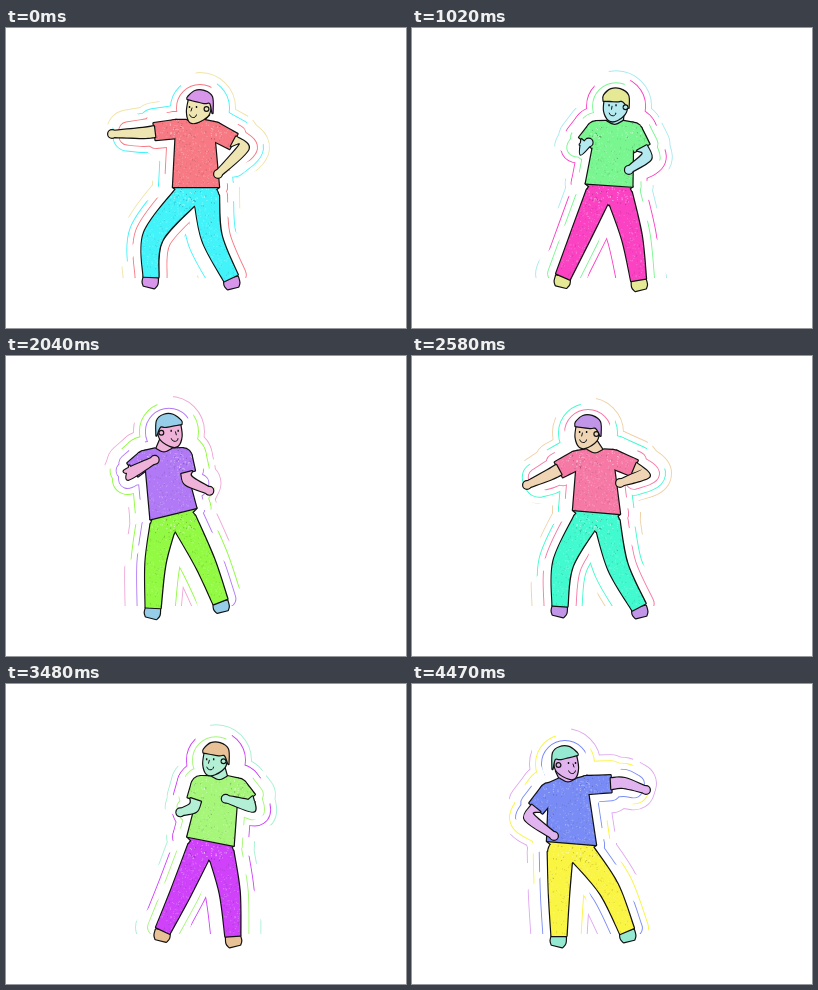
Write an HTML page with a canvas that moves like this. It is 400 by 300 pixels and loops after 4500 ms.

```html
<!DOCTYPE html>
<html>
<head>
<meta charset="utf-8">
<style>
html, body { margin: 0; height: 100%; overflow: hidden; background: #fff; }
canvas { display: block; }
</style>
</head>
<body>
<canvas width="400" height="300"></canvas>
<script>
const ctx = document.querySelector('canvas').getContext('2d');
const LOOP = 4500, DANCE = 2700, STEP = 30, AXIS = 374, INK = '#111';

// Key poses as joints; "left" is the left side of the stage, turn is -1 (facing left) to 1.
// Arms: shoulder, elbow, hand. Legs: waist corner, knee, ankle.
const poses = [
  { time: 0, turn: -1, head: [194, 80],
    armL: [[170, 101], [137, 105], [106, 106]], armR: [[208, 103], [238, 119], [212, 146]],
    legL: [[167, 159], [147, 209], [145, 249]], legR: [[213, 159], [206, 210], [225, 250]] },
  { time: 390, turn: -1, head: [213, 84],
    armL: [[198, 105], [172, 112], [137, 112]], armR: [[239, 110], [261, 131], [226, 149]],
    legL: [[191, 161], [152, 192], [168, 242]], legR: [[236, 167], [218, 210], [227, 251]] },
  { time: 600, turn: -1, head: [213, 76],
    armL: [[200, 101], [195, 124], [169, 134]], armR: [[238, 104], [256, 120], [222, 104]],
    legL: [[186, 152], [176, 206], [161, 245]], legR: [[232, 164], [225, 208], [227, 252]] },
  { time: 1200, turn: -.2, head: [197, 79],
    armL: [[175, 103], [154, 121], [175, 111]], armR: [[212, 103], [227, 128], [218, 151]],
    legL: [[167, 157], [163, 209], [148, 250]], legR: [[214, 157], [217, 209], [226, 251]] },
  { time: 1470, turn: 1, head: [161, 75],
    armL: [[144, 105], [123, 129], [150, 151]], armR: [[182, 95], [222, 88], [243, 92]],
    legL: [[142, 155], [151, 210], [149, 253]], legR: [[191, 158], [209, 196], [222, 245]] },
  { time: 1770, turn: 1, head: [153, 80],
    armL: [[137, 108], [117, 133], [142, 152]], armR: [[175, 101], [212, 99], [234, 106]],
    legL: [[135, 157], [147, 212], [147, 252]], legR: [[184, 161], [197, 205], [215, 247]] },
  { time: 2580, turn: -.7, head: [176, 77],
    armL: [[165, 104], [137, 119], [115, 129]], armR: [[201, 103], [234, 117], [208, 127]],
    legL: [[161, 154], [151, 208], [148, 250]], legR: [[208, 158], [206, 211], [227, 251]] }
];

function mirror(p, time) {
  const flip = ([x, y]) => [AXIS - x, y];
  return { time, turn: -p.turn, head: flip(p.head),
    armL: p.armR.map(flip), armR: p.armL.map(flip), legL: p.legR.map(flip), legR: p.legL.map(flip) };
}
// The way back repeats the twist on the other side.
poses.splice(6, 0, mirror(poses[2], 1950));

// Cyclic spline through the key poses.
function poseAt(time) {
  const n = poses.length, i = poses.findLastIndex(p => p.time <= time);
  const keys = [-1, 0, 1, 2].map(k => poses[(i + k + n) % n]);
  const times = keys.map((p, k) => p.time + DANCE * Math.floor((i + k - 1) / n));
  const span = times[2] - times[1], u = (time - times[1]) / span;
  const mix = ([a, b, c, d]) => {
    if (Array.isArray(b)) return b.map((_, k) => mix([a[k], b[k], c[k], d[k]]));
    const start = (c - a) / (times[2] - times[0]) * span * .8;
    const end = (d - b) / (times[3] - times[1]) * span * .8;
    return b + (c - b) * u * u * (3 - 2 * u) + start * u * (1 - u) ** 2 - end * u * u * (1 - u);
  };
  const names = ['turn', 'head', 'armL', 'armR', 'legL', 'legR'];
  return Object.fromEntries(names.map(name => [name, mix(keys.map(p => p[name]))]));
}

const lerp = (a, b, t) => [a[0] + (b[0] - a[0]) * t, a[1] + (b[1] - a[1]) * t];
const shift = (p, x, y) => [p[0] + x, p[1] + y];

function curve(path, pts) {
  path.lineTo(...pts[0]);
  for (let i = 0; i < pts.length - 1; i++) {
    const a = pts[i], b = pts[i + 1], before = pts[i - 1] || a, after = pts[i + 2] || b;
    path.bezierCurveTo(a[0] + (b[0] - before[0]) / 6, a[1] + (b[1] - before[1]) / 6,
      b[0] - (after[0] - a[0]) / 6, b[1] - (after[1] - a[1]) / 6, ...b);
  }
}

function outline(...curves) {
  const path = new Path2D();
  curves.forEach(pts => curve(path, pts));
  path.closePath();
  return path;
}

const polygon = (...pts) => outline(...pts.map(p => [p]));

function disc([x, y], r) {
  const path = new Path2D();
  path.arc(x, y, r, 0, 7);
  return path;
}

// Tapered tube along the joints.
function limb(joints, widths) {
  const side = sign => joints.map(([x, y], i) => {
    const a = joints[i - 1] || joints[i], b = joints[i + 1] || joints[i];
    const angle = Math.atan2(b[1] - a[1], b[0] - a[0]), r = sign * widths[i] / 2;
    return [x - Math.sin(angle) * r, y + Math.cos(angle) * r];
  });
  return outline(side(1), side(-1).reverse());
}

function random(seed) {
  return () => (seed = seed * 16807 % 2147483647) / 2147483647;
}

function makeGrain() {
  const tile = document.createElement('canvas');
  tile.width = tile.height = 64;
  const c = tile.getContext('2d'), rnd = random(7);
  for (let i = 0; i < 420; i++) {
    c.fillStyle = i % 3 ? 'rgba(255,255,255,.25)' : 'rgba(0,0,0,.13)';
    c.fillRect(rnd() * 64, rnd() * 64, 1, 1);
  }
  return ctx.createPattern(tile, 'repeat');
}
const grain = makeGrain();

// Inks the joint outline of all paths, then fills them.
function paint(paths, ...fills) {
  ctx.strokeStyle = INK;
  ctx.lineWidth = 2.4;
  paths.forEach(p => ctx.stroke(p));
  for (const fill of fills) {
    ctx.fillStyle = fill;
    paths.forEach(p => ctx.fill(p));
  }
}

// Broken contour lines around the whole figure, outermost first.
function drawGlow(paths, [cx, cy], colors) {
  const rnd = random(23);
  colors.forEach((color, k) => {
    const reach = 21 - 6 * k;
    const contour = (style, distance) => {
      ctx.strokeStyle = style;
      ctx.lineWidth = 2 * distance;
      paths.forEach(p => ctx.stroke(p));
    };
    ctx.save();
    const arcs = new Path2D();
    for (let i = 0; i < 7; i++) {
      const from = (i + k / 3 + rnd() * .3) * Math.PI * 2 / 7;
      arcs.moveTo(cx, cy);
      arcs.arc(cx, cy, 200, from, from + .45 + rnd() * .2);
      arcs.closePath();
    }
    ctx.clip(arcs);
    ctx.beginPath();
    ctx.rect(0, 0, 400, 250);
    ctx.clip();
    contour(color, reach);
    ctx.restore();
    contour('#fff', reach - .9);
  });
}

function drawHead([x, y], f, skin, hair) {
  ctx.save();
  ctx.translate(x, y);
  const left = [-12.5, -2 + 7 * f], right = [12.5, -2 - 7 * f];
  paint([outline([[-11, -9], [-11 + 2 * f, 5 + f], [6 * f - 4, 14], [6 * f + 4, 14], [11 + 2 * f, 5 - f], [11, -9]])], skin);
  paint([outline([left, [-12, -11], [-5, -17], [4, -17], [12, -11], right], [right, [-7 * f + 3, -5], [-7 * f - 3, -5], left])], hair);
  paint([disc([(f < 0 ? 1 : -1) * (12.5 - 6 * Math.abs(f)), 1], 1.8)], skin);
  ctx.fillStyle = INK;
  for (const side of [-3.5, 3.5]) ctx.fillRect(7 * f + side - .7, -2, 1.4, 2);
  ctx.lineWidth = 1;
  ctx.beginPath();
  ctx.moveTo(8 * f, 0);
  ctx.lineTo(9 * f, 3);
  ctx.moveTo(7 * f + 3.4, 6.7);
  ctx.arc(7 * f, 6, 3.5, .2, 2.9);
  ctx.stroke();
  ctx.restore();
}

function draw(time) {
  const { turn, head, armL, armR, legL, legR } = poseAt(time % DANCE);
  const color = (h, s, l) => `hsl(${h + time / DANCE * 360} ${s}% ${l}%)`;
  const red = color(355, 88, 72), cyan = color(182, 95, 62), skin = color(50, 65, 82), hair = color(287, 65, 75);

  const waistL = legL[0], waistR = legR[0], middle = lerp(waistL, waistR, .5);
  const legs = [[legL, .27], [legR, .73]].map(([[, knee, ankle], t]) => [shift(lerp(waistL, waistR, t), 0, 10), knee, ankle]);
  const shoes = [[legL, -2], [legR, 2]].map(([[, , ankle], out]) => limb([ankle, shift(ankle, out / 2, 6), shift(ankle, out, 10)], [14, 15, 11]));
  const pants = [
    polygon(waistL, waistR, legs[1][0], shift(middle, 0, 20), legs[0][0]),
    ...legs.map(leg => limb(leg, [25, 20, 15])),
    ...legs.map(([hip]) => disc(hip, 12))
  ];

  const [shoulderL, shoulderR] = [armL[0], armR[0]];
  const collar = shift(lerp(shoulderL, shoulderR, .5), 0, -10);
  const cuffs = [armL, armR].map(([shoulder, elbow]) => lerp(shoulder, elbow, .65));
  const shirt = [
    outline([shift(collar, -9, 0), shift(collar, 0, 4), shift(collar, 9, 0)],
      [shift(shoulderR, 0, -9)], [shoulderR], [waistR], [waistL], [shoulderL], [shift(shoulderL, 0, -9)]),
    ...[armL, armR].flatMap(([shoulder], i) => [limb([shoulder, cuffs[i]], [18, 17]), disc(shoulder, 9)])
  ];
  const forearm = ([, elbow, hand], i, reach) => limb([cuffs[i], elbow, lerp(elbow, hand, reach)], [11, 10, 6]);
  const neck = polygon(shift(head, -6 - 3 * turn, 7), shift(collar, -8, 1), shift(collar, 0, 6), shift(collar, 8, 1), shift(head, 6 - 3 * turn, 7));

  ctx.clearRect(0, 0, 400, 300);
  ctx.lineJoin = ctx.lineCap = 'round';
  drawGlow([...pants, ...shirt, disc(head, 15), ...[armL, armR].map((arm, i) => forearm(arm, i, .5))],
    middle, [color(50, 70, 80), cyan, red]);
  paint(shoes, hair);
  paint(pants, cyan, grain);
  paint([neck], skin);
  paint(shirt, red, grain);
  [armL, armR].forEach((arm, i) => paint([forearm(arm, i, 1), disc(arm[2], 3.8)], skin));
  drawHead(head, turn, skin, hair);
}

function frame() {
  draw(Math.floor(performance.now() % LOOP / STEP) * STEP);
  requestAnimationFrame(frame);
}
frame();
</script>
</body>
</html>
```
